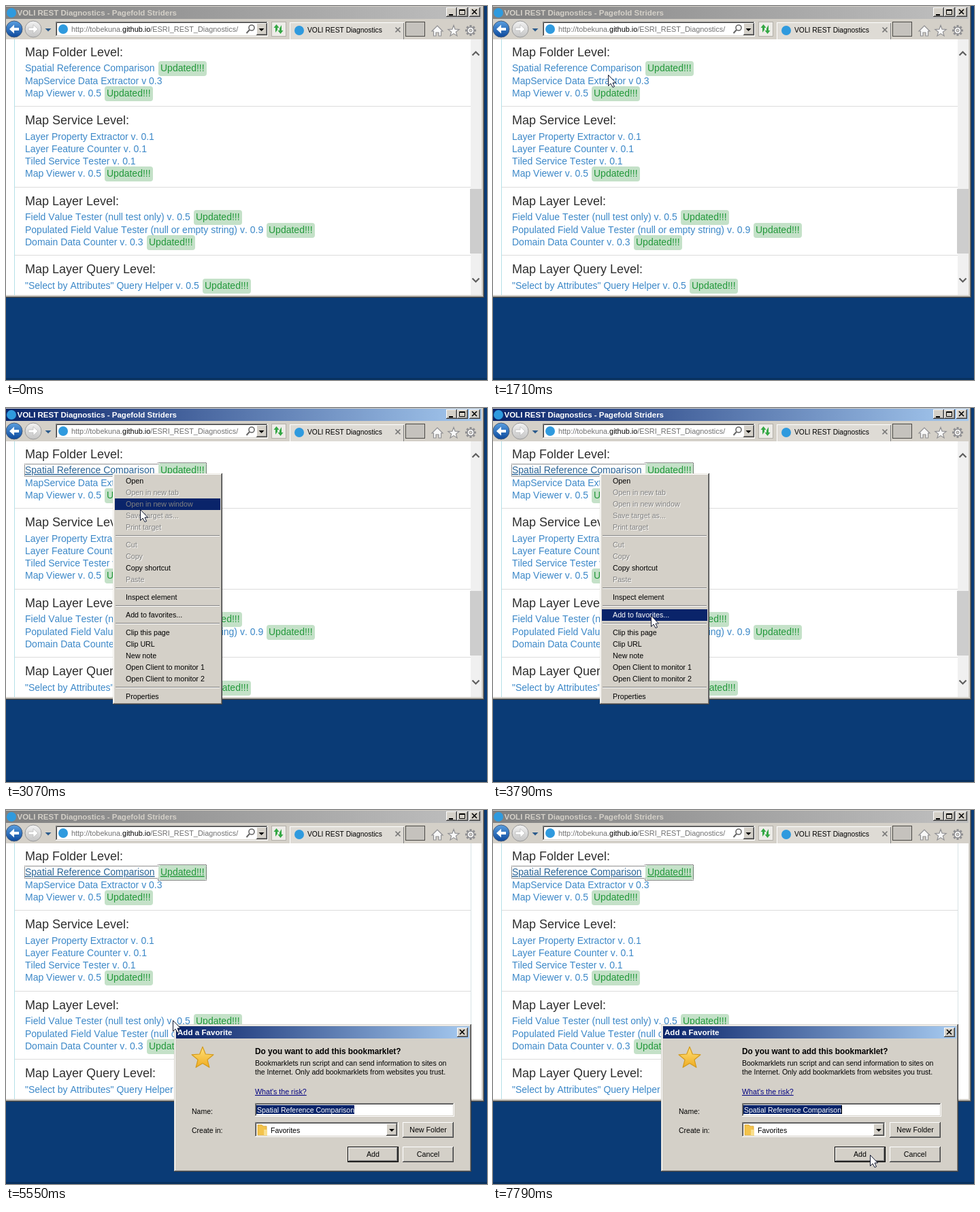
These frames come from a looping animation (707 by 550 pixels, 8 s). An HTML page:

```html
<!DOCTYPE html>
<html lang="en">
<head>
<meta charset="utf-8">
<title>REST Diagnostics</title>
<style>
html, body { margin: 0; width: 100%; height: 100%; overflow: hidden; background: #0a3b76; }
svg { display: block; }
text { font-family: "Liberation Sans", Arial, sans-serif; font-kerning: none; white-space: pre; }
.hover text { text-decoration: underline; }
.hover .link { fill: #2a6496; }
</style>
</head>
<body>
<svg id="stage" xmlns="http://www.w3.org/2000/svg" width="707" height="550" viewBox="0 0 707 550"></svg>
<script>
const FACE = '#d4d0c8', NAVY = '#0a246a', LINK = '#3c88c8';
const LOOP = 8000, START = 350, STEP = 80;

// ---- drawing helpers ----
const rect = (x, y, w, h, fill, more = '') =>
  `<rect x="${x}" y="${y}" width="${w}" height="${h}" fill="${fill}" ${more}/>`;
const text = (x, y, s, size, fill = '#000', more = '') =>
  `<text x="${x}" y="${y}" font-size="${size}" fill="${fill}" ${more}>${s}</text>`;
const path = (d, fill, stroke = 'none', w = 1, more = '') =>
  `<path d="${d}" fill="${fill}" stroke="${stroke}" stroke-width="${w}" ${more}/>`;
const disc = (x, y, r, fill, more = '') => `<circle cx="${x}" cy="${y}" r="${r}" fill="${fill}" ${more}/>`;
const group = (id, s) => `<g id="${id}">${s}</g>`;
const bold = 'font-weight="700"';

// two-tone bevel: raised by default, sunken when the tones are swapped
const bevel = (x, y, w, h, fill, hi = '#fff', lo = '#404040', mid = '#808080') =>
  rect(x, y, w, h, lo) + rect(x, y, w - 1, h - 1, hi) +
  rect(x + 1, y + 1, w - 2, h - 2, mid) + rect(x + 1, y + 1, w - 3, h - 3, fill);
const sunken = (x, y, w, h) => bevel(x, y, w, h, '#fff', '#808080', '#fff', FACE) +
  path(`M${x + 1.5} ${y + h - 2}V${y + 1.5}H${x + w - 2}`, 'none', '#404040');
const cross = (x, y, r, color, w) =>
  path(`M${x - r} ${y - r}L${x + r} ${y + r}M${x + r} ${y - r}L${x - r} ${y + r}`, 'none', color, w);
const down = (x, y, r, color = '#000') => path(`M${x - r} ${y}h${2 * r}l${-r} ${r}z`, color);

function star(x, y, R, r) {
  let d = '';
  for (let i = 0; i < 10; i++) {
    const a = i * Math.PI / 5 - Math.PI / 2, q = i % 2 ? r : R;
    d += (i ? 'L' : 'M') + (x + q * Math.cos(a)).toFixed(1) + ' ' + (y + q * Math.sin(a)).toFixed(1);
  }
  return d + 'Z';
}

function gear(x, y) {
  let s = '';
  for (let i = 0; i < 8; i++)
    s += rect(x - 1.5, y - 8, 3, 4, '#8f8f92', `transform="rotate(${i * 45} ${x} ${y})"`);
  return s + disc(x, y, 5, '#f8f8f8', 'stroke="#8f8f92" stroke-width="1.4"') +
    disc(x, y, 2, FACE, 'stroke="#8f8f92"');
}

// ---- page ----
const heads = [[74, 'Map Folder Level:'], [174, 'Map Service Level:'], [293, 'Map Layer Level:'], [393, 'Map Layer Query Level:']];
const links = [
  [96, 'Spatial Reference Comparison', 224],
  [115, 'MapService Data Extractor v 0.3'],
  [133, 'Map Viewer v. 0.5', 145],
  [197, 'Layer Property Extractor v. 0.1'],
  [215, 'Layer Feature Counter v. 0.1'],
  [233, 'Tiled Service Tester v. 0.1'],
  [251, 'Map Viewer v. 0.5', 145],
  [315, 'Field Value Tester (null test only) v. 0.5', 276],
  [334, 'Populated Field Value Tester (null or empty string) v. 0.9', 383],
  [352, 'Domain Data Counter v. 0.3', 207],
  [416, '"Select by Attributes" Query Helper v. 0.5', 289]
];
const badge = (x, y) => rect(x, y - 15, 71, 22, '#c4e1c8', 'rx="4"') + text(x + 3, y, 'Updated!!!', 14, '#22983a');
const chevron = (y, dir) => path(`M685.5 ${y + 2.5 * dir}L690.5 ${y - 2.5 * dir}L695.5 ${y + 2.5 * dir}`, 'none', '#5e5e5e', 2.2);

const page =
  rect(0, 49, 699, 376, '#fff') + rect(12, 49, 1, 376, '#b5e0e8') +
  [147, 266, 366].map(y => rect(13, y, 670, 1, '#dcdcdc')).join('') +
  rect(683, 49, 1, 376, '#d8e2e4') +
  heads.map(([y, s]) => text(28, y, s, 18, '#2e2e2e')).join('') +
  links.map(([y, s, b], i) => group('row' + i, text(28, y, s, 14, LINK, 'class="link"') + (b ? badge(b, y) : ''))).join('') +
  group('focus', path('M27.5 82.5H223.5V80.5H294.5V103.5H223.5V100.5H27.5Z', 'none', '#222', 1,
    'stroke-dasharray="1 1" stroke-dashoffset=".5"')) +
  group('scroll', rect(683, 49, 16, 376, '#f0f0f0') + rect(682, 269, 17, 95, '#cdcdcd') + chevron(70, 1) + chevron(403, -1));

// ---- browser frame ----
const title = (id, fill, color) => group(id, rect(0, 1, 699, 18, `url(#${fill})`) +
  text(16.5, 14, 'VOLI REST Diagnostics - Pagefold Striders', 11.5, color, bold));
const logo = (x, y) => disc(x, y, 7, '#2f9ade');

const frame =
  rect(0, 0, 703, 429, '#404040') + rect(0, 0, 702, 428, '#808080') + rect(0, 0, 701, 427, FACE) +
  title('idle', 'grey', FACE) + title('active', 'blue', '#fff') + logo(8, 10) +
  bevel(647, 2, 16, 14, FACE) + rect(651, 12, 6, 2, '#000') +
  bevel(663, 2, 16, 14, FACE) + path('M666.5 5.5h8v7h-8zM666 6.5h9', 'none', '#000') +
  bevel(681, 2, 16, 14, FACE) + cross(688.5, 8.5, 3.5, '#000', 1.6) +
  rect(0, 19, 699, 30, FACE) +
  disc(12, 34, 12, 'url(#back)', 'stroke="#4a5d78"') +
  path('M5 34L12 27.5V32H19V36H12V40.5Z', '#fff') +
  disc(40, 34, 12, 'url(#next)', 'stroke="#9a9a9a"') +
  path('M47 34L40 27.5V32H33V36H40V40.5Z', '#fff', '#b5b5b5', .7) +
  down(62, 33, 4.5, '#2b5b8c') +
  sunken(73, 23, 312, 22) + logo(84, 34) +
  text(96, 38, 'http://tobekuna.<tspan fill="#000">github.io</tspan>/ESRI_REST_Diagnostics/', 10.9, '#707070') +
  disc(361, 32, 4, 'none', 'stroke="#666" stroke-width="1.6"') + path('M358 35L353.5 40', 'none', '#666', 2) +
  bevel(368, 25, 16, 18, FACE) + down(375.5, 33, 4) +
  rect(390.5, 23.5, 21, 21, '#eeece8', 'stroke="#b3b0a9"') +
  path('M396 39V32H393.5L397.5 27L401.5 32H399V35M405 28V36H407.5L403.5 41L399.5 36H402V33', '#35a845') +
  rect(417, 24, 168, 25, '#fff') + rect(418, 25, 167, 24, '#dedbd5') + rect(584, 25, 1, 24, '#808080') +
  logo(431, 36) + text(443, 39, 'VOLI REST Diagnostics', 10.3) + cross(576, 35, 3.5, '#777', 1.7) +
  rect(587.5, 23.5, 28, 21, '#c5c2bd', 'stroke="#4a4945"') +
  path('M626 37L634 29L642 37H639.5V44H636V39H632V44H628.5V37Z', '#f8f8f8', '#8f8f92', 1.2) +
  path(star(658, 37, 8.5, 3.6), '#f8f8f8', '#8f8f92', 1.2) + gear(683, 36);

// ---- context menu: label, row centre, disabled ----
const items = [
  ['Open', 107], ['Open in new tab', 124, 1], ['Open in new window', 141, 1], ['Save target as...', 158, 1],
  ['Print target', 175, 1], ['Cut', 201, 1], ['Copy', 218, 1], ['Copy shortcut', 235], ['Paste', 252, 1],
  ['Inspect element', 278], ['Add to favorites...', 304], ['Clip this page', 330], ['Clip URL', 347],
  ['New note', 364], ['Open Client to monitor 1', 381], ['Open Client to monitor 2', 398], ['Properties', 424]
];
const menu = bevel(157, 96, 161, 340, FACE, '#ece9e2') +
  rect(158, 97, 158, 1, '#fff') + rect(158, 97, 1, 336, '#fff') +
  [187, 264, 290, 316, 410].map(y => rect(161, y, 153, 1, '#808080') + rect(161, y + 1, 153, 1, '#fff')).join('') +
  items.map(([s, y, off], i) =>
    (off ? group('shade' + i, text(177, y + 5, s, 10.7, '#fff')) : '') +
    group('bar' + i, rect(160, y - 8, 155, 17, NAVY)) +
    text(176, y + 4, s, 10.7, off ? '#808080' : '#000', `id="item${i}"`)).join('');

// ---- dialog ----
const caption = (x, y, s) => text(x + 37.5, y + 15, s, 10.7, '#000', 'text-anchor="middle"');
const button = (x, y, s) => bevel(x, y, 75, 23, FACE) + caption(x, y, s);
const mainButton = (x, y, s) => rect(x, y, 75, 23, '#000') + bevel(x + 1, y + 1, 73, 21, FACE) + caption(x, y, s);
const label = (x, y, s) => text(x, y, s, 10.5);
const dialog =
  bevel(247, 315, 437, 217, FACE, FACE) + path('M248.5 530V316.5H682', 'none', '#fff') +
  rect(250, 318, 431, 18, 'url(#blue)') + text(252, 331, 'Add a Favorite', 11.6, '#fff', bold) +
  bevel(663, 320, 16, 14, FACE) + cross(670.5, 326.5, 3.5, '#000', 1.6) +
  path(star(289, 365, 16.8, 7.4), 'url(#gold)', '#d39a1c', 1.2, 'stroke-linejoin="round"') +
  text(366, 359, 'Do you want to add this bookmarklet?', 11.85, '#000', bold) +
  label(366, 376, 'Bookmarklets run script and can send information to sites on') +
  label(366, 389, 'the Internet. Only add bookmarklets from websites you trust.') +
  text(366, 418, "What's the risk?", 10.7, '#000080', 'text-decoration="underline"') +
  label(273, 447, 'Name:') + sunken(366, 431, 293, 20) +
  rect(368, 434, 144, 13, NAVY) + text(369, 445, 'Spatial Reference Comparison', 10.5, '#fff') +
  group('caret', rect(512, 434, 1, 13, '#000')) +
  label(273, 475, 'Create in:') + sunken(366, 459, 211, 22) +
  path('M370 463h6l2 2h5v13h-13z', '#f3c34c', '#d9a12c', .8) + rect(379, 470, 5, 9, '#f9de8d') +
  label(389, 475, 'Favorites') + bevel(559, 461, 16, 18, FACE) + down(567, 469, 4) +
  button(583, 459, 'New Folder') + mainButton(502, 495, 'Add') + button(583, 495, 'Cancel');

// ---- pointers, each with its hot spot at 0,0 ----
const arrow = path('M.5 .5V16.5L4 13L7 18.5L9.5 17.5L7 12H11.5Z', '#fff', '#101830');
const hand = path('M-1.5 13V1.5Q0 -.5 1.5 1.5V7Q3.5 5.5 5 7.5Q7 6 8 8.5Q10.5 7.5 11 10V15L9 18V21H0V18.5L-4.5 12.5Q-4.5 9.5 -1.5 12Z', '#fff', '#000');
const busy = disc(0, 0, 8, '#fff', 'fill-opacity=".35" stroke="#5f9fc4" stroke-width="4"') +
  path('M-7.5 -2A8 8 0 0 1 5 -6', 'none', '#c5e6f4', 2.5) + disc(0, 0, 10, 'none', 'stroke="#8a9aa4" stroke-width=".6"');

const ramp = (id, a, b, dir = 'x2="1" y2="0"') =>
  `<linearGradient id="${id}" x1="0" y1="0" ${dir}><stop stop-color="${a}"/><stop offset="1" stop-color="${b}"/></linearGradient>`;
const vert = 'x2="0" y2="1"';
const stage = document.getElementById('stage');
stage.innerHTML = '<defs>' + ramp('grey', '#808080', '#c0c0c0') + ramp('blue', NAVY, '#a6caf0') +
  ramp('back', '#5a9fe0', '#0b489c', vert) + ramp('next', '#f2f2f2', '#c4c4c4', vert) + ramp('gold', '#ffe27a', '#efab20', vert) + '</defs>' +
  rect(0, 0, 707, 550, '#0a3b76') + rect(0, 547, 707, 3, '#08315f') +
  frame + page + group('menu', menu) + group('dialog', dialog) +
  group('arrow', arrow) + group('hand', hand) + group('busy', busy);

// ---- motion: time, x, y ----
const trail = [
  [350, 596, 502], [750, 484, 316], [1150, 361, 163], [1390, 262, 124], [1710, 169, 101], [2030, 158, 96],
  [2430, 158, 96], [2510, 157, 96], [2830, 157, 96], [2910, 165, 106], [3070, 197, 149], [3390, 225, 245],
  [3710, 231, 302], [3790, 232, 305], [5470, 232, 305], [5550, 245, 309], [5870, 380, 338], [6270, 508, 384],
  [6350, 516, 401], [6750, 573, 466], [6910, 570, 484], [7150, 570, 484], [7230, 569, 487], [7790, 554, 507]
];
function pointer(t) {
  let i = trail.findIndex(p => p[0] > t);
  if (i < 0) return trail[trail.length - 1].slice(1);
  i = Math.max(i, 1);
  const a = trail[i - 1], b = trail[i], k = Math.max(0, (t - a[0]) / (b[0] - a[0]));
  return [1, 2].map(n => Math.round(a[n] + (b[n] - a[n]) * k));
}

const el = {};
stage.querySelectorAll('[id]').forEach(e => el[e.id] = e);
const show = (id, on) => el[id].style.display = on ? '' : 'none';

function draw(now) {
  const raw = now % LOOP;
  const t = raw < START ? 0 : START + Math.floor((raw - START) / STEP) * STEP;
  const [x, y] = pointer(t);
  const menuOn = t >= 2510 && t < 4990, active = t >= 2350 && t < 4990, waiting = t === 4990;
  const row0 = t >= 1790, row1 = t > 0 && t < 1710 && x < 229 && y > 103 && y < 118;
  const onLink = (row0 && t < 2510) || row1;

  show('idle', !active);
  show('active', active);
  show('focus', t >= 2350);
  show('scroll', t < 5070);
  el.scroll.style.opacity = waiting ? .35 : 1;
  el.row0.classList.toggle('hover', row0);
  el.row1.classList.toggle('hover', row1);

  show('menu', menuOn);
  items.forEach(([, c, off], i) => {
    const lit = menuOn && y >= c - 8 && y < c + 9 && t >= 2910;
    show('bar' + i, lit);
    if (off) show('shade' + i, !lit);
    else el['item' + i].setAttribute('fill', lit ? '#fff' : '#000');
  });

  show('dialog', t >= 5070);
  show('caret', t >= 5600 && Math.floor((t - 5600) / 530) % 2 === 0);

  const kind = waiting ? 'busy' : onLink ? 'hand' : 'arrow';
  for (const id of ['arrow', 'hand', 'busy']) show(id, t > 0 && id === kind);
  el[kind].setAttribute('transform', `translate(${x} ${y})`);
}

const begin = performance.now();
function tick() {
  draw(performance.now() - begin);
  requestAnimationFrame(tick);
}
tick();
</script>
</body>
</html>
```
